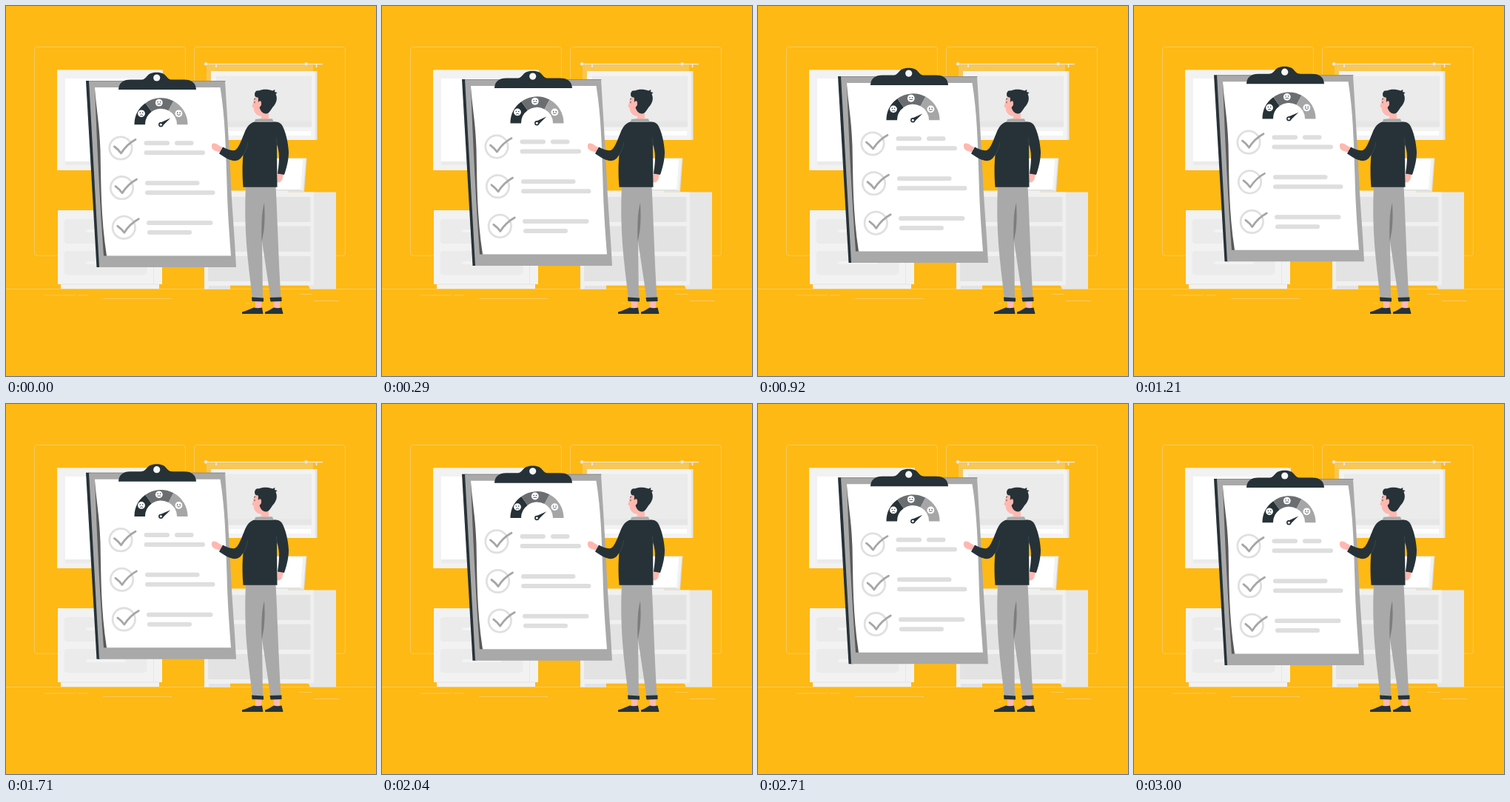
An HTML page for the animation above (3.04 s loop, 500 px wide and 500 px high).

```html
<!DOCTYPE html>
<html lang="en">
<head>
<meta charset="utf-8">
<title>Checklist</title>
<style>
  html, body { margin: 0; width: 100%; height: 100%; overflow: hidden; background: #feb914; }
  svg { display: block; width: 100vw; height: 100vh; }
  .line { fill: none; stroke: #ebebeb; stroke-opacity: .6; stroke-width: .6; }
  .dark { fill: #263238; }
  .grey { fill: #a9a9a9; }
  .skin { fill: #ffb8b0; }
  .bars { fill: none; stroke: #dedede; stroke-width: 6; stroke-linecap: round; }
  .tick { fill: none; stroke: #a6a6a6; stroke-width: 2.8; stroke-linecap: round; stroke-linejoin: round; }
</style>
</head>
<body>
<svg viewBox="0 0 500 500">
  <defs>
    <g id="check">
      <circle r="15.2" fill="none" stroke="#e0e0e0" stroke-width="2.8"/>
      <path class="tick" d="M-8.5-2Q-3 2 .5 7Q8-5 20-11.500"/>
    </g>
    <g id="face">
      <circle r="4.9" fill="#fff"/>
      <circle class="dark" cx="-1.7" cy="-1" r=".75"/>
      <circle class="dark" cx="1.700" cy="-1" r=".75"/>
    </g>
  </defs>

  <!-- Room -->
  <rect class="line" x="38.500" y="55.300" width="204" height="282" rx="4"/>
  <rect class="line" x="254.500" y="55.300" width="204" height="282" rx="4"/>
  <path class="line" d="M0 382.500H500M52 391H94M97 391H111M131 395.500H224M396 389.500H414M416 398.500H450M323 402H330"/>

  <!-- Picture -->
  <path fill="#ebebeb" d="M69 86.500H212V222H69z"/>
  <path fill="#f2f2f2" d="M69 86.500H209V222H69z"/>
  <path fill="#fff" d="M80 98H201V210H80z"/>
  <path fill="#e8e8e8" d="M80 210H201V215H80z" opacity=".6"/>

  <!-- Left cabinet -->
  <path fill="#f2f2f2" d="M70 276H211V376H207V382H74V376H70z"/>
  <path fill="#e6e6e6" d="M199 276H200V376H199zM74 375.500H207V376.500H74z"/>
  <rect x="78.500" y="288" width="112" height="33" rx="5" fill="#ebebeb"/>
  <rect x="78.500" y="331" width="112" height="32.500" rx="5" fill="#ebebeb"/>
  <path stroke="#f3f3f3" stroke-width="4" stroke-linecap="round" d="M110 304H160M110 347H160"/>

  <!-- Window and blind -->
  <path fill="#e6e6e6" opacity=".3" d="M271 80H415V176H271z"/>
  <path fill="#e6e6e6" d="M277 88H420.500V181H277z"/>
  <path fill="#f3f3f3" d="M277 88H417.500V181H277z"/>
  <path fill="#ebebeb" d="M284 94.500H413V163.500H284z"/>
  <path fill="#e6e6e6" d="M284 155.500H413V163.500H284z"/>
  <path fill="#fff" d="M284 169H412V175H284z"/>
  <path stroke="#e8e8e8" stroke-width="1.700" d="M269 78.500H428M284 79V83M419.500 79V83"/>
  <circle cx="270" cy="78.300" r="2.200" fill="#e6e6e6"/>
  <circle cx="405.500" cy="78.300" r="2.200" fill="#e6e6e6"/>

  <!-- Right cabinet and screen -->
  <path fill="#e0e0e0" d="M362 205.500H406.500L403 251H360z"/>
  <path fill="#fff" d="M362 206H401.500L398.500 248H360z"/>
  <path fill="#f2f2f2" d="M366 206H405L401.500 249H398L401.500 207z"/>
  <path fill="#e6e6e6" d="M268 251.500H446V382.500H411L408.500 377.500H303V382.500H268z"/>
  <path fill="#f0f0f0" d="M268 249.500H381V251.500H416V377.500H303V382.500H268z"/>
  <path fill="#e3e3e3" d="M273 258H411.500V292H273zM273 297.500H411.500V332H273zM273 338H411.500V372H273zM274 378H303V382.500H274zM381 249.700H403V251.500H381z"/>

  <!-- Clipboard -->
  <g id="board">
    <path class="dark" d="M108 101H114L128 353H122.500z"/>
    <path class="grey" d="M112 101H296C299 150 301 180 303 220C305 270 309 310 311 353H126z"/>
    <path fill="#8c8c8c" d="M112 101H296.500V102H112z"/>
    <path fill="#595959" d="M120 110C123 190 127 270 132 337.500H137V320L128 160z"/>
    <path fill="#fff" d="M120 110H289.500C296 150 297 190 298.500 240C299.500 280 302 310 304 337.500H136C128 285 128.500 240 127.500 195C126.500 160 122 140 120 110z"/>

    <path class="dark" d="M152 113C152.500 104 158 99.500 168 99.500H182C192 99.500 188 89.700 203.500 89.700C219 89.700 215 99.500 225 99.500H241C251 99.500 256.500 104 257 113z"/>
    <circle cx="203.700" cy="97" r="4.600" fill="#f7f7f7"/>

    <g id="gauge" fill="none" stroke-width="14.500"></g>
    <use href="#face" x="183" y="145.300"/>
    <use href="#face" x="206.800" y="130.700"/>
    <use href="#face" x="233.400" y="145.300"/>
    <path fill="none" stroke="#263238" stroke-width=".8" stroke-linecap="round" d="M181.200 147.900Q183 145.700 184.800 147.900M205 132.500H208.600M231.300 146.200Q233.400 149 235.500 146.200"/>
    <path class="dark" d="M207.300 158.200L222.300 151.500L211 162.500z"/>
    <circle class="dark" cx="209.300" cy="160.200" r="3.200"/>
    <circle cx="209.300" cy="160.200" r="1.500" fill="#fff"/>

    <path class="bars" d="M189.500 185.300H218M231 185.300H250.500M189.500 198.300H266M191 239.200H258.500M191 252.200H279.500M193 293H276.500M194 306H248"/>
    <use href="#check" x="155" y="192"/>
    <use href="#check" x="156.500" y="245.700"/>
    <use href="#check" x="159.300" y="299.300"/>
  </g>

  <!-- Man -->
  <path class="skin" d="M337 398H345V410H337zM362 398H370V410H362z"/>
  <path class="dark" d="M319 416V413.500C326 411.500 331 409 335 407.500Q340 409 346 407.500L347.500 416zM350 416V413.500C355 412 359 409 362 407.500Q367 409 372.500 407.500L374.500 416z"/>
  <path class="grey" d="M324 243H364.500C367 290 368 340 371.500 395H357.500L346 318L347 395H333C328 350 321 310 324 243z"/>
  <path fill="#7d7d7d" d="M349 266C345 280 345 300 345.500 318C349 305 350.500 290 349 266z"/>
  <path class="dark" d="M332 393.500L348 394.500V399.500L332.500 399zM356.500 394L372.500 393.500V399L357.500 399.500z"/>
  <path class="skin" d="M367 225L375 227L373.500 234Q371 239 366 238.500zM292 191L287 188C284 185 279 184.500 278 187.500C277.500 191 278.500 194 282 195.500L290 198z"/>
  <path class="dark" d="M336 156.500C329 158 325 164 322 172C317 184 314 193 309 195C304 196 298 193 293 190.500L288 199.500C296 205 304 210 311 209C316 208 318 205 320.500 201C319 217 319.500 230 320.500 244.800H366.500L366 187C369 195 370.500 205 367 226.500L376 228C380 216 382 207 382 197C381 183 378 170 373 161C370 156.500 365 156.500 361 156.500z"/>
  <path fill="none" stroke="#455a64" stroke-width=".5" d="M320.500 201Q325 195 327 184M366 187Q366 181 365 178"/>
  <path class="grey" d="M337 153Q349 151.500 360 152.500L361.500 156.500Q349 157.500 336 156.500z"/>
  <path class="skin" d="M336 123C334 127 334.500 131 332.500 135Q332 137 334.500 137C335 144 338 148 345 149V152.500H355V139L350 122z"/>
  <path class="dark" d="M336.500 122C335 117 338 113.500 341.500 114.500C347 112 355 112.500 360 114.500L363.500 113L363 116L366.500 117L364.500 119C367 124 366 130 362 135C358 139 356.500 145 352 145.500C347 146 344 142 342.500 137Q346 134 344.500 129Q342 127 341 131C340.500 127 341.500 125 340.500 123.500Q338 123.500 336.500 122z"/>
  <path class="skin" d="M341 130Q344.500 127 345 131.500Q344.500 136 341 136.500z"/>
  <path stroke="#263238" stroke-width=".8" stroke-linecap="round" d="M335.300 126L336.800 125.500M336 129.500V130.800"/>
</svg>
<script>
  const LOOP = 3040, PEAK = 1500, LIFT = 9.7;
  const board = document.getElementById('board');

  // Gauge arcs: start angle, end angle (degrees), colour
  const at = deg => {
    const a = deg * Math.PI / 180;
    return `${209.500 + 28.800 * Math.cos(a)} ${160.300 - 28.800 * Math.sin(a)}`;
  };
  document.getElementById('gauge').innerHTML = [
    [180, 126, '#263238'], [126, 62, '#6b6e71'], [62, 0, '#a6a6a6']
  ].map(([from, to, color]) =>
    `<path stroke="${color}" d="M${at(from)}A28.800 28.800 0 0 1 ${at(to)}"/>`).join('');

  function draw(now) {
    const t = now % LOOP;
    const rise = Math.max(0, 1 - Math.abs(t - PEAK) / PEAK);
    board.setAttribute('transform', `translate(0 ${-LIFT * rise})`);
    requestAnimationFrame(draw);
  }
  draw(performance.now());
</script>
</body>
</html>
```
